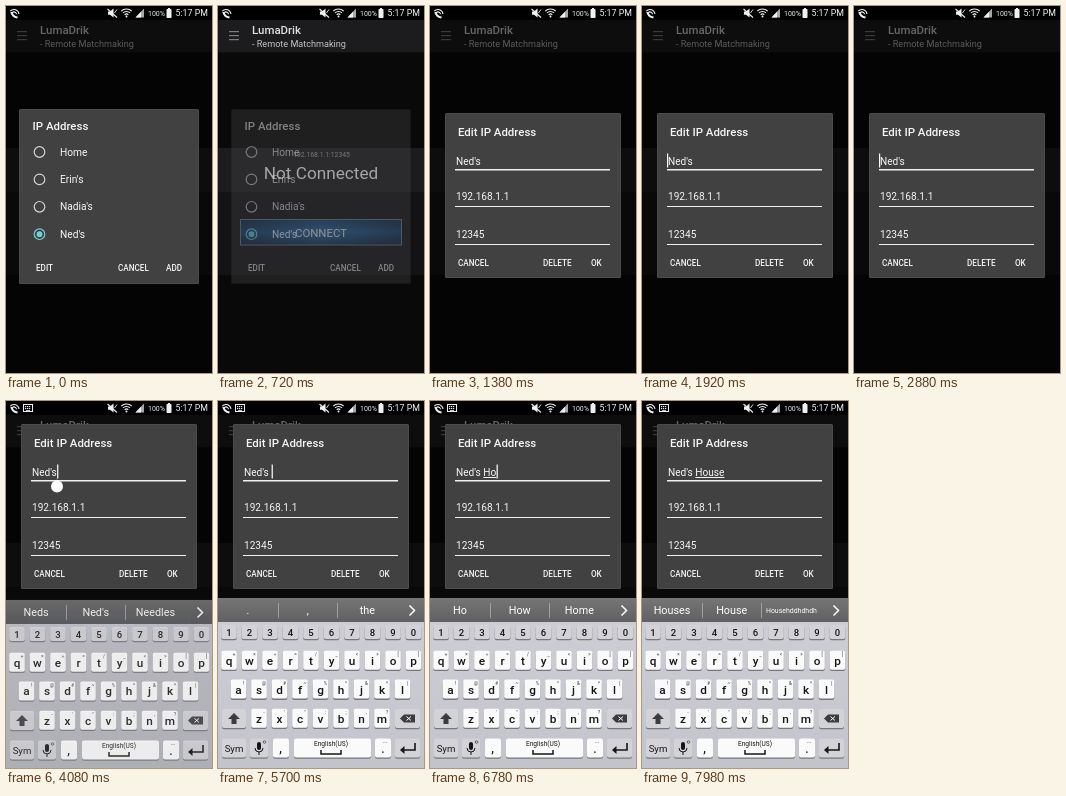
These frames come from a looping animation (206x367 px, 8000 ms). An HTML page with a canvas:

```html
<!DOCTYPE html>
<html lang="en">
<head>
<meta charset="utf-8">
<title>IP address editor</title>
<style>
html, body { margin: 0; width: 100%; height: 100%; overflow: hidden; background: #000; }
canvas { display: block; width: 206px; height: 367px; }
</style>
</head>
<body>
<canvas id="stage"></canvas>
<script>
const W = 206, H = 367, LOOP = 8000;
const canvas = document.getElementById('stage');
const c = canvas.getContext('2d');
const ratio = Math.max(1, window.devicePixelRatio || 1);
canvas.width = W * ratio;
canvas.height = H * ratio;

const NAME = "Ned's";
const LABELS = ['Home', "Erin's", "Nadia's", NAME];

// typed text with its three suggestions, from a given time on
const TYPING = [
  [0, '', ['Neds', NAME, 'Needles']],
  [5500, ' ', ['.', ',', 'the']],
  [6480, ' H', ['H', 'He', 'Have']],
  [6760, ' Ho', ['Ho', 'How', 'Home']],
  [7000, ' Hou', ['Hou', 'House', 'Hours']],
  [7220, ' Hous', ['Hous', 'House', 'Houses']],
  [7440, ' House', ['Houses', 'House', 'Househddhdhdh']]
];
const SHIFT_ON = 6120, SHIFT_OFF = 6480;
const FOCUS = 850, TAP = 3050;

const span = (t, a, b) => Math.min(1, Math.max(0, (t - a) / (b - a)));
const easeOut = (p, n = 3) => 1 - Math.pow(1 - p, n);

function rect(x, y, w, h, color) {
  c.fillStyle = color;
  c.fillRect(x, y, w, h);
}

function round(x, y, w, h, r, color) {
  c.fillStyle = color;
  c.beginPath();
  c.roundRect(x, y, w, h, r);
  c.fill();
}

function circle(x, y, r, color, line) {
  c.beginPath();
  c.arc(x, y, r, 0, 7);
  if (line) {
    c.lineWidth = line;
    c.strokeStyle = color;
    c.stroke();
  } else {
    c.fillStyle = color;
    c.fill();
  }
}

function path(points, color, line) {
  c.beginPath();
  points.forEach(([x, y], i) => i ? c.lineTo(x, y) : c.moveTo(x, y));
  if (line) {
    c.lineWidth = line;
    c.strokeStyle = color;
    c.stroke();
  } else {
    c.fillStyle = color;
    c.fill();
  }
}

function blend(x0, y0, x1, y1, ...colors) {
  const g = c.createLinearGradient(x0, y0, x1, y1);
  colors.forEach((color, i) => g.addColorStop(i / (colors.length - 1), color));
  return g;
}

// y is the middle of the capitals
function text(s, x, y, size, color = '#f6f6f6', align = 'left', weight = 400) {
  c.font = `${weight} ${size}px Roboto, sans-serif`;
  c.textAlign = align;
  c.fillStyle = color;
  c.fillText(s, x, y + size * 0.36);
  return c.measureText(s).width;
}

function faded(alpha, draw) {
  if (alpha <= 0) return;
  c.save();
  c.globalAlpha = alpha;
  draw();
  c.restore();
}

function arcs(x, y, radii, from, to, line) {
  c.strokeStyle = '#f0f0f0';
  c.lineWidth = line;
  for (const r of radii) {
    c.beginPath();
    c.arc(x, y, r, from, to);
    c.stroke();
  }
}

function statusBar(t) {
  const ink = '#f0f0f0';
  rect(0, 0, W, 14, '#000');
  // handset with waves
  c.beginPath();
  c.moveTo(5.5, 6);
  c.quadraticCurveTo(6, 10.5, 11.5, 11.5);
  c.strokeStyle = ink;
  c.lineWidth = 2.2;
  c.stroke();
  arcs(8, 8.5, [2.5, 5], -2.4, -0.1, 1.1);

  // keyboard icon
  if (t > 3360) {
    c.strokeStyle = ink;
    c.lineWidth = 1;
    c.strokeRect(17.5, 3.5, 9, 7);
    for (let x = 19; x < 25; x += 2) {
      rect(x, 5, 1.2, 1.2, ink);
      rect(x, 7, 1.2, 1.2, ink);
    }
    rect(20, 9, 4, 0.8, ink);
  }

  // muted speaker
  path([[102, 5.5], [104, 5.5], [107.5, 2.5], [107.5, 11.5], [104, 8.7], [102, 8.7]], ink);
  path([[101.5, 3], [111, 11.5]], ink, 1.1);
  path([[111, 3.5], [108.5, 7]], ink, 0.9);
  // wifi and signal
  arcs(120.5, 10.5, [2.5, 5, 7.5], -2.35, -0.8, 1.2);
  circle(120.5, 10.5, 1, ink);
  path([[129.5, 11.5], [138, 11.5], [138, 2.5]], '#a8a8a8');
  path([[129.5, 11.5], [135, 11.5], [135, 5.7]], ink);

  text('100%', 142, 7, 7, ink);
  round(160.5, 3, 5, 9, 0.8, ink);
  rect(162, 2, 2, 1.2, ink);
  text('5:17 PM', 169.5, 7, 8.8, ink);
}

function mainScreen() {
  rect(0, 0, W, H, '#0a0a0b');
  rect(0, 14, W, 32, '#202022');
  rect(0, 46, W, 1, '#111');
  for (let i = 0; i < 3; i++) rect(11, 25 + i * 4, 10, 1.2, '#909090');
  text('LumaDrik', 34, 24.3, 11.44, '#fff', 'left', 500);
  text('- Remote Matchmaking', 34, 38, 9.1, '#e0e0e0');

  rect(0, 142, W, 44, '#202022');
  rect(0, 186, W, 83, '#161618');
  text('192.168.1.1:12345', 103.5, 148.3, 6.8, '#b0b0b0', 'center');
  text('Not Connected', 103, 166.5, 17.2, '#fff', 'center');

  rect(22, 213, 162, 26.5, '#5f7388');
  rect(23, 214, 160, 24.5, blend(23, 0, 183, 0, '#173d68', '#2763a0', '#173d68'));
  rect(23, 214, 160, 24.5, blend(0, 214, 0, 238, 'rgba(0,0,0,.3)', 'rgba(0,0,0,0)', 'rgba(0,0,0,.4)'));
  text('CONNECT', 103, 227, 11.4, '#dcdcdc', 'center');
}

function panel(x, y, w, h) {
  round(x, y, w, h, 1.5, '#4c4c4c');
  round(x + 1, y + 1, w - 2, h - 2, 1, '#414141');
}

function button(s, x, y) {
  text(s, x, y, 8.15, '#f6f6f6', 'left', 500);
}

function listDialog() {
  text('IP Address', 26.5, 120, 11.44, '#f6f6f6', 'left', 500);
  LABELS.forEach((s, i) => {
    const y = 146 + i * 27.4, on = s === NAME;
    circle(33.5, y, 5.3, on ? '#72d0d6' : '#d4d4d4', 1.2);
    if (on) circle(33.5, y, 2.9, '#72d0d6');
    text(s, 54, y, 10.2);
  });
  button('EDIT', 30, 262.5);
  button('CANCEL', 112, 262.5);
  button('ADD', 160, 262.5);
}

function cursorOn(t, typedAt) {
  const from = typedAt || (t >= TAP ? TAP : FOCUS);
  return Math.floor((t - from) / 500) % 2 === 0;
}

function editDialog(t, typedAt, typed) {
  panel(15, 107, 176, 165);
  text('Edit IP Address', 28, 125.7, 11.44, '#f6f6f6', 'left', 500);
  const value = NAME + typed;
  const end = 26 + text(value, 26, 155, 10.1);
  text('192.168.1.1', 26, 190, 10.1);
  text('12345', 26, 228.5, 10.1);
  rect(25, 163, 155, 1.5, '#f0f0f0');
  rect(25, 200, 155, 1, '#f0f0f0');
  rect(25, 238, 155, 1, '#f0f0f0');

  if (typed.length > 1) {
    c.font = '400 10.1px Roboto, sans-serif';
    const start = 26 + c.measureText(NAME + ' ').width;
    rect(start, 160, end - start, 1, '#f0f0f0');
  }
  if (cursorOn(t, typedAt)) rect(t < TAP ? 25 : end + 0.3, 147.5, 1.2, 14, '#fff');
  if (t >= TAP && !typedAt) {
    path([[51, 162.5], [46.5, 167], [55.5, 167]], '#fff');
    circle(51, 169.5, 6, '#fff');
  }
  button('CANCEL', 28, 257);
  button('DELETE', 113, 257);
  button('OK', 161, 257);
}

function key(x, y, w, h, special) {
  round(x, y + 1.3, w, h, 2, '#77777d');
  round(x, y, w, h, 2, special ? '#d2d2d7' : '#fafafb');
}

function letters(row, marks, x0, y, upper) {
  [...row].forEach((s, i) => {
    const x = x0 + i * 20.5;
    key(x - 7.8, y - 9.7, 15.6, 19);
    text(marks[i], x + 5, y - 6, 4.5, '#55555a', 'center', 500);
    text(upper ? s.toUpperCase() : s, x, y, 11.8, '#161618', 'center', 500);
  });
}

function keyboard(words, upper) {
  const ink = '#161618';
  rect(0, 197, W, 24, blend(0, 197, 0, 221, '#757576', '#616163'));
  rect(0, 221, W, H - 221, blend(0, 221, 0, H, '#cdcdd4', '#c3c3cb'));
  for (const x of [60, 119]) rect(x, 202, 1, 15, '#a0a0a2');
  words.forEach((s, i) => text(s, 30 + i * 59.7, 209.5, s.length > 9 ? 6.95 : 10.8, '#fff', 'center'));
  path([[191.5, 204.5], [196.5, 209.5], [191.5, 214.5]], '#fff', 1.5);

  [...'1234567890'].forEach((s, i) => {
    const x = 11 + i * 20.5;
    key(x - 7.8, 224, 15.6, 14, true);
    text(s, x, 231.7, 9.5, ink, 'center', 500);
  });
  letters('qwertyuiop', '+×÷=/_<>[]', 11, 259.5, upper);
  letters('asdfghjkl', '!@#~%^&*(', 20.5, 288.3, upper);
  letters('zxcvbnm', '-\'":;,?', 41, 317.5, upper);

  // shift and backspace
  key(4, 308, 24, 19, true);
  path([[16, 312], [22, 318], [18.5, 318], [18.5, 323], [13.5, 323], [13.5, 318], [10, 318]], upper ? '#2f8fc4' : '#3c3c40');
  key(177, 308, 25, 19, true);
  path([[182, 317.5], [186, 313.5], [197, 313.5], [197, 321.5], [186, 321.5]], '#3c3c40');
  path([[188.5, 315.5], [193, 319.5]], '#fff', 1);
  path([[193, 315.5], [188.5, 319.5]], '#fff', 1);

  // bottom row
  key(4, 337.5, 24, 19, true);
  text('Sym', 16, 347.5, 9.6, ink, 'center');
  key(32, 337.5, 18, 19, true);
  round(39, 341, 4, 8, 2, ink);
  c.beginPath();
  c.arc(41, 347, 4, 0, Math.PI);
  c.strokeStyle = ink;
  c.lineWidth = 1;
  c.stroke();
  rect(40.5, 351, 1, 3, ink);
  circle(46.5, 341, 1.3, '#55555a', 0.9);
  key(55, 337.5, 16, 19);
  text(',', 62.5, 347.5, 12, ink, 'center', 500);
  key(76, 337.5, 77, 19);
  text('English(US)', 113, 343, 6.6, ink, 'center');
  path([[103, 349], [103, 353], [123, 353], [123, 349]], ink, 1.5);
  key(157, 337.5, 16, 19);
  text('.', 165, 347.5, 12, ink, 'center', 500);
  text('…', 167, 339.5, 6, ink, 'center');
  key(177, 337.5, 25, 19, true);
  path([[197, 342], [197, 349], [184, 349]], ink, 1.6);
  path([[186.5, 345], [182, 349], [186.5, 353]], ink);
}

function draw(t) {
  const [since, typed, words] = TYPING.findLast(step => t >= step[0]);
  const listAlpha = 1 - easeOut(span(t, 600, 900), 1.5);
  const listShade = listAlpha ** 2;
  const editAlpha = easeOut(span(t, 1080, 1300), 2);
  const lift = 84 * easeOut(span(t, 3300, 3600));
  const keys = span(t, 3840, 4200);

  c.setTransform(ratio, 0, 0, ratio, 0, 0);
  mainScreen();
  faded(0.6 * Math.max(listShade, editAlpha), () => rect(0, 14, W, H, '#000'));
  // the panel fades ahead of its labels
  faded(listShade, () => panel(13, 103, 180, 175));
  faded(listAlpha, listDialog);
  faded(editAlpha, () => {
    c.translate(0, -lift);
    editDialog(t, since, typed);
  });
  faded(easeOut(keys, 2), () => {
    c.translate(0, 54 * (1 - easeOut(keys)));
    keyboard(words, t >= SHIFT_ON && t < SHIFT_OFF);
  });
  statusBar(t);
}

function tick() {
  draw(performance.now() % LOOP);
  requestAnimationFrame(tick);
}
tick();
</script>
</body>
</html>
```
